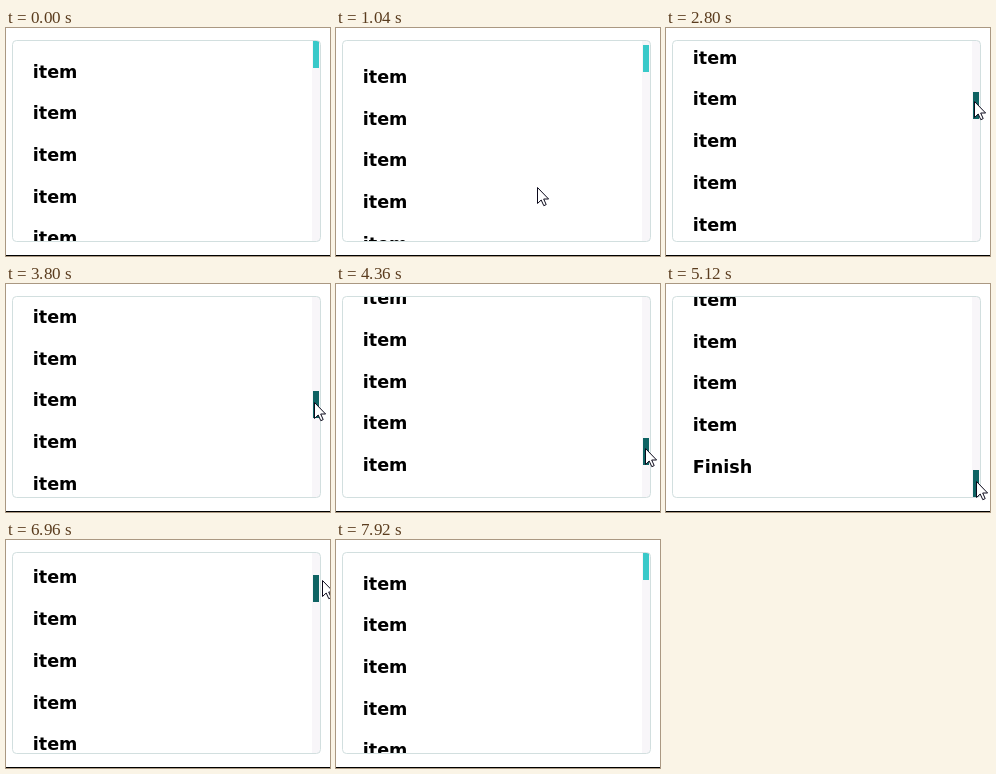
Animation, 324 px wide and 228 px high, one loop 8360 ms. Source, as an HTML page with a canvas:

```html
<!DOCTYPE html>
<html lang="en">
<head>
<meta charset="utf-8">
<title>Custom scrollbar</title>
<style>
  html, body { margin: 0; width: 100%; height: 100%; overflow: hidden; background: #fff; }
  canvas { display: block; width: 324px; height: 228px; }
</style>
</head>
<body>
<canvas id="stage" width="324" height="228"></canvas>
<script>
const ctx = document.getElementById('stage').getContext('2d');
const LOOP = 8360, TICK = 40;
const VIEW = { x: 7, y: 13, w: 307, h: 200 };
const THUMB_H = 27, ITEMS = 36, LINE = 41.72, FIRST = 49.57;
const MAX_SCROLL = Math.ceil(ITEMS * LINE + 18.72) - VIEW.h;
const RATIO = 7.6; // content pixels per thumb pixel

// [ms, value]
const scrollKeys = [
  [960, 0], [1520, 355.4], [1800, 389.4], [3000, 389.4], [3800, 720],
  [4840, MAX_SCROLL], [6080, MAX_SCROLL], [6960, 173], [7160, 0]
];

// [ms, x, y]
const pointerKeys = [
  [400, 192, 232], [760, 201, 159], [1840, 201, 159], [2520, 308, 73],
  [3000, 308, 73], [3800, 308, 118], [4840, 310, 197], [6080, 310, 197],
  [6960, 316, 40], [7200, 312, 7], [7760, 218, 181], [7920, 203, 232]
];

// [ms, thumb colour]
const IDLE = '#39c9c9', HOVER = '#239393', ACTIVE = '#0f6363';
const thumbStates = [
  [0, IDLE], [2440, HOVER], [2760, ACTIVE], [5680, HOVER],
  [6120, ACTIVE], [7320, IDLE]
];

// Monotone cubic through keys; moves start and stop at half speed
function track(keys, col, t) {
  const last = keys.length - 1;
  if (t <= keys[0][0]) return keys[0][col];
  if (t >= keys[last][0]) return keys[last][col];
  const slope = i => i < 0 || i >= last ? 0
    : (keys[i + 1][col] - keys[i][col]) / (keys[i + 1][0] - keys[i][0]);
  let i = 0;
  while (t >= keys[i + 1][0]) i++;
  const here = slope(i);
  const tangent = other => {
    if (other === 0) return here / 2;
    return here * other > 0 ? 2 * here * other / (here + other) : 0;
  };
  const span = keys[i + 1][0] - keys[i][0];
  const u = (t - keys[i][0]) / span, v = 1 - u;
  return keys[i][col] * (1 + 2 * u) * v * v + keys[i + 1][col] * u * u * (3 - 2 * u)
    + span * u * v * (tangent(slope(i - 1)) * v - tangent(slope(i + 1)) * u);
}

function drawList(scroll) {
  ctx.save();
  ctx.beginPath();
  ctx.rect(VIEW.x, VIEW.y, VIEW.w, VIEW.h);
  ctx.clip();
  ctx.fillStyle = '#000';
  ctx.font = 'bold 17.6px "DejaVu Sans", sans-serif';
  for (let i = 0; i < ITEMS; i++) {
    const y = Math.round(FIRST + i * LINE - scroll);
    if (y > -10 && y < 240) ctx.fillText(i === ITEMS - 1 ? 'Finish' : 'item', 26.7, y);
  }
  ctx.restore();
}

function drawScrollbar(scroll, colour) {
  ctx.fillStyle = '#f8f6f9';
  ctx.fillRect(306, VIEW.y, 8, VIEW.h);
  ctx.fillStyle = colour;
  ctx.fillRect(307, VIEW.y + Math.floor(scroll / RATIO), 6, THUMB_H);
}

function drawFrame() {
  ctx.lineWidth = 1;
  ctx.strokeStyle = '#d2dfdf';
  ctx.beginPath();
  ctx.roundRect(6.5, 12.5, 308, 201, 4);
  ctx.stroke();
  ctx.fillStyle = '#000';
  ctx.fillRect(0, 227, 324, 1);
}

const arrow = new Path2D('M.5 .5V16.5L4.2 13L6.8 18.7L9.2 17.6L6.7 12H11.6Z');

function drawPointer(x, y) {
  ctx.save();
  ctx.translate(Math.round(x), Math.round(y));
  ctx.fillStyle = '#fff';
  ctx.fill(arrow);
  ctx.strokeStyle = '#0c0a1c';
  ctx.stroke(arrow);
  ctx.restore();
}

function render(now) {
  const t = Math.floor((now % LOOP) / TICK) * TICK;
  const scroll = track(scrollKeys, 1, t);
  const state = thumbStates.filter(s => s[0] <= t).pop();
  ctx.fillStyle = '#fff';
  ctx.fillRect(0, 0, 324, 228);
  drawList(scroll);
  drawScrollbar(scroll, state[1]);
  drawFrame();
  drawPointer(track(pointerKeys, 1, t), track(pointerKeys, 2, t));
}

const start = performance.now();
function loop() {
  render(performance.now() - start);
  requestAnimationFrame(loop);
}
loop();
</script>
</body>
</html>
```
